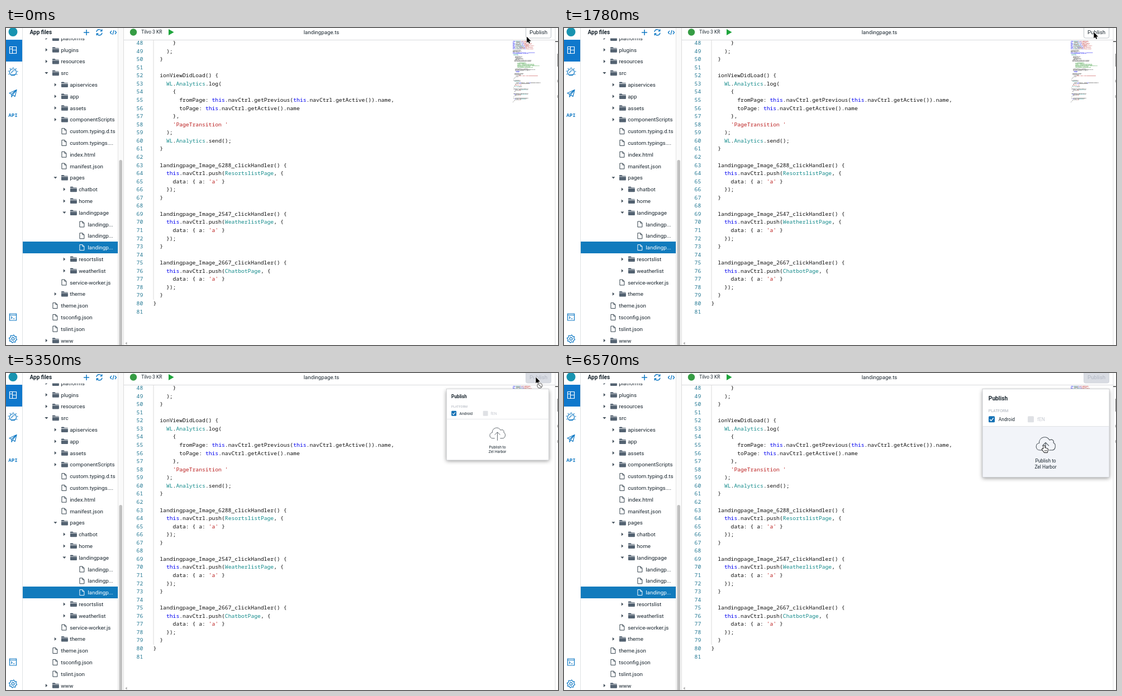
These frames come from a looping animation (988x567 px, 8000 ms). An HTML page with a canvas:

```html
<!DOCTYPE html>
<html lang="en">
<head>
<meta charset="utf-8">
<title>Code editor</title>
<style>
html, body { margin: 0; width: 988px; height: 567px; overflow: hidden; background: #fff; }
canvas { display: block; }
</style>
</head>
<body>
<canvas id="stage" width="988" height="567"></canvas>
<script>
const W = 988, H = 567, LOOP = 8000;
const SANS = 'Roboto, "Open Sans", sans-serif';
const MONO = '"Noto Sans Mono", "Liberation Mono", monospace';
const INK = '#1b2730', BLUE = '#1079c4', SLATE = '#536271', GREEN = '#1fa53c';
const TYPE = '#128a8a', WORD = '#0000f0', STR = '#bb1f1f';

const view = document.getElementById('stage').getContext('2d');
const layer = document.createElement('canvas');
layer.width = W;
layer.height = H;
let g = layer.getContext('2d');

function rect(x, y, w, h, color) {
  g.fillStyle = color;
  g.fillRect(x, y, w, h);
}

function label(str, x, y, size, color = INK, weight = 400, align = 'left', family = SANS) {
  g.font = `${weight} ${size}px ${family}`;
  g.textAlign = align;
  g.fillStyle = color;
  g.fillText(str, x, y);
}

function disc(x, y, r, color) {
  g.fillStyle = color;
  g.beginPath();
  g.arc(x, y, r, 0, 7);
  g.fill();
}

function shape(d, x, y, { fill, stroke, width = 1 }) {
  const p = new Path2D(d);
  g.save();
  g.translate(x, y);
  g.lineJoin = 'round';
  g.lineWidth = width;
  if (stroke) { g.strokeStyle = stroke; g.stroke(p); }
  if (fill) { g.fillStyle = fill; g.fill(p); }
  g.restore();
}

const line = (d, x, y, stroke = BLUE, width = 1.2) => shape(d, x, y, { stroke, width });

// ---- file tree: level, kind (+ closed, - open, . file), name
const tree = `0+platforms
0+plugins
0+resources
0-src
1+apiservices
1+app
1+assets
1+componentScripts
1.custom.typing.d.ts
1.custom.typings....
1.index.html
1.manifest.json
1-pages
2+chatbot
2+home
2-landingpage
3.landingp...
3.landingp...
3.landingp...
2+resortslist
2+weatherlist
1.service-worker.js
1+theme
0.theme.json
0.tsconfig.json
0.tslint.json
0+www`.split('\n');

function drawTree() {
  const picked = 18;
  g.save();
  g.beginPath();
  g.rect(30, 18.5, 171, H);
  g.clip();
  tree.forEach((row, i) => {
    const x = 98.4 + 16 * row[0], y = 18.2 + 20.8 * i, kind = row[1];
    const on = i === picked;
    if (on) rect(30, 382, 170, 21, '#117bbd');
    if (kind === '.') {
      shape('M.5.5H5.5L8.5 3.5V10.5H.5ZM5.5.5V3.5H8.5', x - 15, y - 5.5,
        { stroke: on ? '#fff' : '#34424d', width: 1 });
    } else {
      shape('M0 1Q0 0 1 0H4.5L6 1.5H11Q12 1.5 12 2.5H0ZM0 3.3H12V8.5Q12 9.5 11 9.5H1Q0 9.5 0 8.5Z',
        x - 15.5, y - 4.8, { fill: SLATE });
      shape(kind === '+' ? 'M-1.6-3L1.8 0-1.6 3Z' : 'M-3-1.6H3L0 1.8Z', x - 26, y, { fill: '#44515c' });
    }
    label(row.slice(2), x - 0.2, y + 3.6, 9.86, on ? '#fff' : INK);
  });
  g.restore();
  rect(200, 0, 1, H, '#e3e3e3');
  rect(201, 0, 9, H, '#fafafa');
  rect(210, 0, 1, H, '#dcdcdc');
  g.fillStyle = '#c1c1c1';
  g.beginPath();
  g.roundRect(202.5, 236, 5.5, H - 232, 3);
  g.fill();
}

function drawRail() {
  rect(29, 0, 1, H, '#dfe2e5');
  disc(12.5, 7, 8, '#1793b0');
  rect(0, 21, 29, 39, '#0f78cc');
  line('M.5.5H12.5V12.5H.5ZM5.5.5V12.5M5.5 6.5H12.5M.5 4.5H5.5', 6, 33, '#fff');
  line('M6 0A6 6 0 1 1-6 0A6 6 0 1 1 6 0', 12.5, 79);
  for (let i = 0; i < 7; i++) {
    const a = Math.PI * (0.85 + i * 0.22), c = Math.cos(a), s = Math.sin(a);
    line(`M${c * 7.2} ${s * 7.2}L${c * 9} ${s * 9}`, 12.5, 79);
  }
  line('M-3 2L-1-2 3-3M-4 5L4 4', 12.5, 79);
  line('M0 6L13 0 10 12 6 9 4 13 4 8ZM4 8L13 0 6 9', 6, 110.5);
  label('API', 12.5, 158.7, 9.2, BLUE, 600, 'center', MONO);
  line('M.5.5H12.5V12.5H.5ZM.5 3H12.5M3 5.5L5 7.5 3 9.5M6.5 9.5H9.5', 6, 510.5);
  let cog = '';
  for (let i = 0; i <= 32; i++) {
    const a = (i + 0.5) / 32 * Math.PI * 2, r = i % 4 < 2 ? 7 : 5.4;
    cog += `${i ? 'L' : 'M'}${Math.cos(a) * r} ${Math.sin(a) * r}`;
  }
  line(cog + 'M2.4 0A2.4 2.4 0 1 1-2.4 0A2.4 2.4 0 1 1 2.4 0', 12.5, 556);
}

function drawHeader() {
  label('App files', 42.6, 11.3, 10, INK, 700);
  line('M-5 0H5M0-5V5', 144, 8, BLUE, 1.5);
  line('M-5-.8A5 5 0 0 1 4.2-2.8M5 .8A5 5 0 0 1-4.2 2.8M4.8-5.5V-2.2H1.5M-4.8 5.5V2.2H-1.5', 167, 7.8, BLUE, 1.4);
  line('M-3-3L-5.5 0-3 3M3-3L5.5 0 3 3M1-4L-1 4', 192, 8, BLUE, 1.3);
  disc(228, 7.5, 6.2, '#359c43');
  label('Tilvo 3 KR', 242.2, 10.3, 8.4);
  shape('M0 0L9.5 5.5 0 11Z', 291, 2, { fill: GREEN });
  label('landingpage.ts', 564.5, 11.4, 9.7, INK, 400, 'center');
  rect(211, 21, 772, 1, '#d9dadd');
}

// ---- code, first row is line 48
const code = `      }
    );
  }

  ionViewDidLoad() {
    WL.Analytics.log(
      {
        fromPage: this.navCtrl.getPrevious(this.navCtrl.getActive()).name,
        toPage: this.navCtrl.getActive().name
      },
      'PageTransition '
    );
    WL.Analytics.send();
  }
`.split('\n');
for (const [id, page] of [[6288, 'Resortslist'], [2547, 'Weatherlist'], [2667, 'Chatbot']]) {
  code.push(`  landingpage_Image_${id}_clickHandler() {`, `    this.navCtrl.push(${page}Page, {`,
    "      data: { a: 'a' }", '    });', '  }', '');
}
code.splice(-1, 1, '}', '');

const token = /'[^']*'|\bthis\b|\b(?:WL|Analytics|[A-Z]\w*Page)\b|\s+|[^\s']+?(?=\b(?:this|WL|Analytics|[A-Z]\w*Page)\b|\s|'|$)/g;

function tint(s) {
  if (s[0] === "'") return STR;
  if (s === 'this') return WORD;
  return /^(WL|Analytics|[A-Z]\w*Page)$/.test(s) ? TYPE : '#111';
}

function eachToken(row, visit) {
  for (const m of row.matchAll(token)) if (m[0].trim()) visit(m[0], m.index, tint(m[0]));
}

function drawCode() {
  const pitch = 14.56, cell = 5.83, size = cell / 0.6;
  rect(263.5, 22, 1, 464, '#d9d9d9');
  code.forEach((row, i) => {
    const y = 30.1 + i * pitch;
    label(48 + i, 233.6, y, size, '#237893', 400, 'left', MONO);
    eachToken(row, (s, col, color) => label(s, 263.6 + col * cell, y, size, color, 400, 'left', MONO));
  });
  shape('M3 0L0 2.5 3 5Z', 213.5, 561.5, { fill: '#a8a8a8' });
}

// ---- minimap
function drawMap() {
  let seed = 7;
  const rnd = () => (seed = seed * 16807 % 2147483647) / 2147483647;
  const bar = (row, col, len, color) => {
    g.globalAlpha = 0.55;
    for (let i = 0; i < len; i++) {
      if (rnd() < 0.86) rect(907 + (col + i) * 0.68, 23 + row * 1.38, 0.68, 0.95, color);
    }
    g.globalAlpha = 1;
  };
  for (let r = 0; r < 11; r++) {
    const n = 10 + rnd() * 14 | 0;
    bar(r, 0, 6, WORD);
    bar(r, 7, n, r % 3 ? '#222' : TYPE);
    bar(r, n + 8, 4, WORD);
    bar(r, n + 13, 10 + rnd() * 16, STR);
  }
  // first row, last row, indent, shortest, longest, colour
  const blocks = [
    [12, 14, 0, 12, 36, '#222'], [15, 16, 0, 40, 66, WORD], [17, 18, 2, 8, 28, TYPE],
    [20, 24, 6, 8, 24, '#222'], [25, 26, 4, 30, 50, '#222'], [28, 34, 12, 22, 58, '#1b8a1b'],
    [36, 38, 6, 34, 56, '#222'], [39, 40, 8, 8, 30, WORD], [42, 43, 4, 12, 24, '#222'],
    [44, 44, 8, 12, 13, '#222'], [45, 45, 12, 46, 56, STR], [46, 46, 8, 6, 10, '#222']
  ];
  for (const [a, b, col, lo, hi, color] of blocks) {
    for (let r = a; r <= b; r++) bar(r, col, lo + rnd() * (hi - lo), color);
  }
  code.forEach((row, i) => eachToken(row, (s, col, color) => bar(47 + i, col, s.length, color)));
}

function drawEdge() {
  rect(982.5, 0, 1, H, '#dfe1e4');
  rect(983, 23.5, 5, 1.5, '#444');
  rect(987, 46, 1, 23, '#777');
  line('M1.5 0Q-.5 2.5 1.5 5', 986.5, 92.5, '#888', 1);
  line('M1.5 0Q-.5 2.5 1.5 5', 986.5, 120, '#888', 1);
}

function drawButton(off) {
  g.beginPath();
  g.roundRect(930.5, -4.5, 45, 22.5, 3);
  g.fillStyle = off ? '#d9dce3' : '#fff';
  g.fill();
  g.strokeStyle = off ? '#d3d6de' : '#bfc4ca';
  g.lineWidth = 1;
  g.stroke();
  label('Publish', 953, 11.4, 9.7, off ? '#b2b8c4' : INK, 400, 'center');
}

function drawPopup(scale, hover) {
  g.save();
  g.translate(953, 28.4);
  g.scale(scale, scale);
  g.translate(-953, -28.4);
  g.shadowColor = 'rgba(0,0,0,.4)';
  g.shadowBlur = 7;
  g.shadowOffsetY = 2.5;
  rect(749, 28.4, 227, 158, '#fff');
  g.shadowColor = 'transparent';
  if (hover) rect(749, 96, 227, 90.4, '#f2f4f9');
  g.strokeStyle = '#c4c6ca';
  g.lineWidth = 0.8;
  g.strokeRect(749, 28.4, 227, 158);
  label('Publish', 759.8, 49.2, 10.2, INK, 700);
  label('PLATFORM', 759.8, 70.3, 7, '#a9afb9');
  g.fillStyle = '#1170b4';
  g.beginPath();
  g.roundRect(760, 77.3, 11, 11, 1.5);
  g.fill();
  line('M0 2.6L2.3 5 6.4 0', 762.3, 80.4, '#fff', 1.4);
  label('Android', 777.8, 86, 8.4);
  g.fillStyle = '#dfe1e5';
  g.beginPath();
  g.roundRect(830, 77.3, 11, 11, 1.5);
  g.fill();
  label('fEN', 847, 86, 8.4, '#c6cad1');
  rect(749, 95, 227, 1, '#e1e3e6');
  line('M-6 10H-10.5C-18.5 10-19-2-11.5-2.5C-12-14 3-17 7-8C12-10.5 15.5-7 14-3C19-1.5 18.5 10 11.5 10H6M0 15V-3.5M-6 2.3L0-3.7 6 2.3',
    862, 128, '#4d555c', 1.1);
  label('Publish to', 862, 160.2, 8.4, INK, 400, 'center');
  label('Zel Harbor', 862, 170.8, 8.4, INK, 400, 'center');
  g.restore();
}

function drawCursor(kind, x, y) {
  if (kind === 'hand') {
    shape('M3 7V1.6Q4 0 5.2 1.6V5L9.3 6Q11 6.6 10.7 8.8L9.6 13H4.4Q2.6 10 .7 8.3Q.2 6.6 1.6 6.5Z', x, y,
      { fill: '#fff', stroke: '#111', width: 1.8 });
    line('M5.2 9V11.2M6.9 9V11.2M8.5 9V11.2', x, y, '#111', 0.7);
    return;
  }
  shape('M0 0V11L2.5 8.8 4.1 12.3 5.9 11.5 4.4 8.1H7.8Z', x, y, { fill: '#000', stroke: '#fff', width: 1.6 });
  if (kind === 'ban') {
    disc(x + 7, y + 15, 5.8, '#fff');
    line('M4.4 0A4.4 4.4 0 1 1-4.4 0A4.4 4.4 0 1 1 4.4 0M-3.1-3.1L3.1 3.1', x + 7, y + 15, '#8a8a8a', 1.5);
  }
}

// start time, x, y, pointer
const moves = [
  [0, 932, 15.5], [150, 947, 9], [300, 952.5, 6], [570, 946, 9], [690, 933, 10], [810, 920.7, 6],
  [930, 917, 4], [1050, 917, 8], [1160, 925, 10], [1280, 938, 8], [1430, 941, 5], [1550, 944, 4],
  [1660, 947, 6], [1780, 948.3, 7.5], [5020, 945.3, 7, 'hand'], [5170, 948.3, 7.5, 'ban'],
  [5830, 942, 14, 'ban'], [5980, 895.7, 68.5], [6130, 888, 85.5], [6270, 872, 115],
  [6420, 857, 130.5], [6570, 855.3, 129, 'hand']
];

rect(0, 0, W, H, '#fff');
drawTree();
drawRail();
drawHeader();
drawCode();
drawMap();
drawEdge();
g = view;

function frame(now) {
  const t = now % LOOP;
  g.drawImage(layer, 0, 0);
  drawButton(t >= 5170);
  if (t >= 5350) drawPopup(t < 5530 ? 0.807 : 1, t >= 6420);
  const [, x, y, kind] = moves.findLast(m => t >= m[0]);
  drawCursor(kind, x, y);
  requestAnimationFrame(frame);
}
requestAnimationFrame(frame);
</script>
</body>
</html>
```
